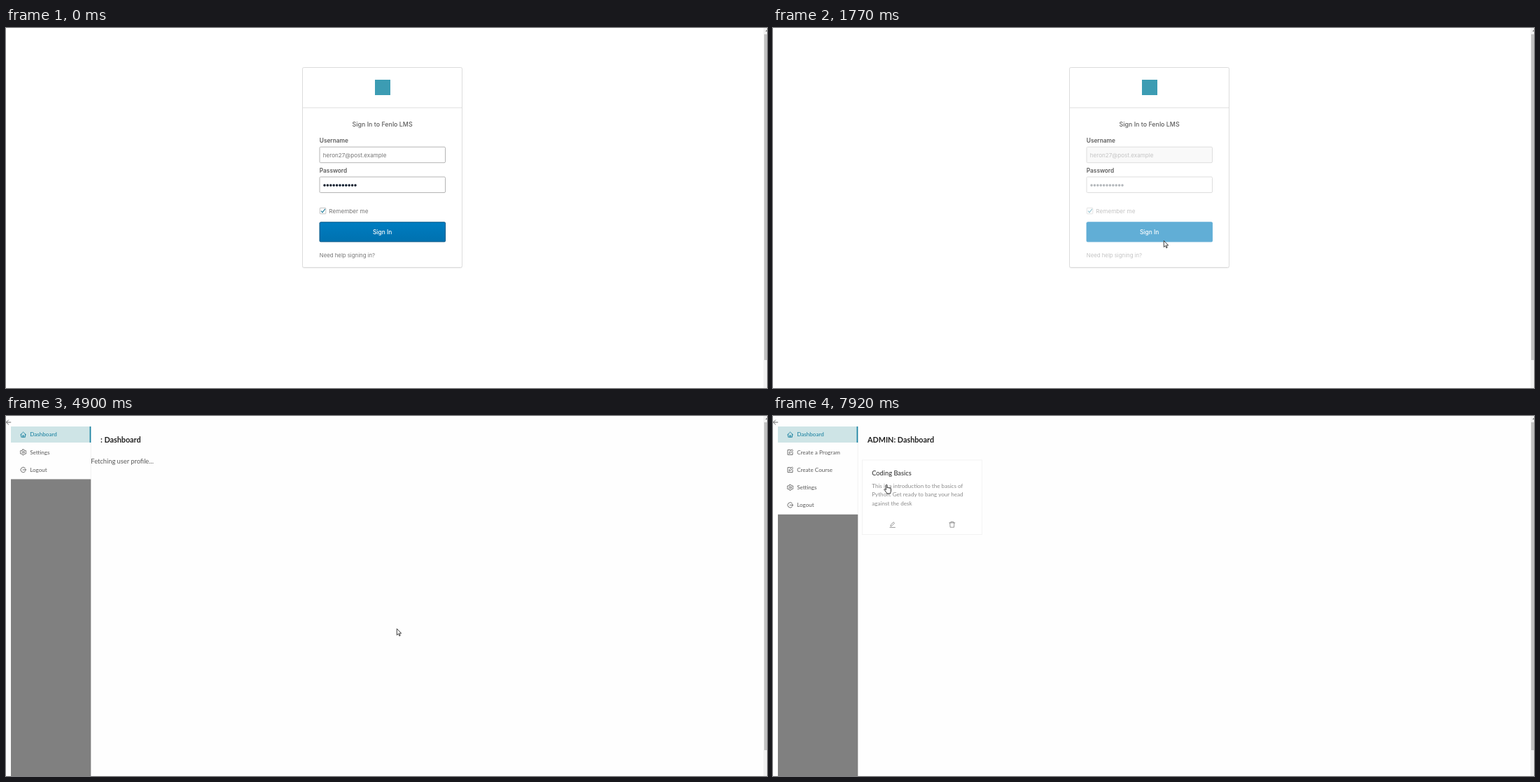
Write an HTML page that moves like this. It is 1087 by 515 pixels and loops after 8 s.

```html
<!DOCTYPE html>
<html lang="en">
<head>
<meta charset="utf-8">
<title>Sign in and dashboard</title>
<style>
html, body { margin: 0; width: 100%; height: 100%; overflow: hidden; background: #fff; }
svg { display: block; width: 1087px; height: 515px; }
#login { font: 400 8px Inter, sans-serif; fill: #777; }
#login .label { font-weight: 600; font-size: 8.3px; fill: #5e5e5e; }
#login .field { fill: #fff; stroke: #b4b4b4; }
#login .dots { fill: #0b1a2b; }
#login .button { fill: url(#blue); stroke: #00517f; }
#login .button.hover { fill: url(#bright); }
#login .tick { stroke: #24809c; }
#login .busy .field { stroke: #dedede; }
#login .busy .user { fill: #f9f9f9; }
#login .busy .soft { fill: #c4c4c4; }
#login .busy .dots { fill: #b3b7bb; }
#login .busy .button { fill: #61aed6; stroke: #61aed6; }
#login .busy .tick { stroke: #9cc8d4; }
#app { font: 400 8.1px Lato, sans-serif; fill: #595959; }
.icon { fill: none; stroke: currentColor; stroke-width: .85; stroke-linejoin: round; stroke-linecap: round; }
</style>
</head>
<body>
<svg viewBox="0 0 1087 515" xmlns="http://www.w3.org/2000/svg">
  <defs>
    <linearGradient id="blue" x2="0" y2="1"><stop stop-color="#007dc1"/><stop offset="1" stop-color="#0071af"/></linearGradient>
    <linearGradient id="bright" x2="0" y2="1"><stop stop-color="#008ad3"/><stop offset="1" stop-color="#007dc0"/></linearGradient>
    <filter id="blur" x="-5%" y="-30%" width="110%" height="160%"><feGaussianBlur stdDeviation="1.3"/></filter>
    <g id="home" class="icon"><path d="M-4 .4 0-3.6 4 .4M-2.9-.6V3.6H2.9V-.6M-.9 3.6V1.2H.9V3.6"/></g>
    <g id="edit" class="icon"><path d="M3.4 0V3.6H-3.6V-3.4H.6M-1.4 1.4-1.1-.4 2.6-4 4-2.6.3 1.1Z"/></g>
    <g id="gear" class="icon"><path d="M-1-3.9H1L1.4-2.7 2.5-2.1 3.6-2.5 4.3-1 3.4 0 4.3 1 3.6 2.5 2.5 2.1 1.4 2.7 1 3.9H-1L-1.4 2.7-2.5 2.1-3.6 2.5-4.3 1-3.4 0-4.3-1-3.6-2.5-2.5-2.1-1.4-2.7Z"/><circle r="1.4"/></g>
    <g id="exit" class="icon"><path d="M2.7-2.6A3.7 3.7 0 1 0 2.7 2.6M-.6 0H4M2.8-1.2 4 0 2.8 1.2"/></g>
  </defs>
  <rect id="page" width="1087" height="515" fill="#fff"/>

  <g id="login"><g id="form">
    <rect x="423.5" y="57.3" width="228" height="286" rx="2" fill="none" stroke="#ececec"/>
    <rect x="423.5" y="56.5" width="228" height="286" rx="2" fill="#fff" stroke="#dcdcdc"/>
    <path d="M424 114H651" stroke="#dedede"/>
    <rect x="527" y="74" width="22" height="22" fill="#3c9cb3"/>
    <g id="spinner">
      <path d="M523 114H552" stroke="#fff" stroke-width="3"/>
      <circle cx="537.7" cy="114" r="8.2" fill="#fff" stroke="#a9b8c6" stroke-width="1.3"/>
      <path id="arc" d="M537.7 105.8A8.2 8.2 0 0 1 545.9 114" fill="none" stroke="#0c79b8" stroke-width="1.4"/>
    </g>
    <text class="label" x="537.6" y="141.2" text-anchor="middle" style="font-size:8.9px;font-weight:500">Sign In to Fenlo LMS</text>
    <text class="label" x="447.8" y="164.3">Username</text>
    <rect class="field user" x="448" y="170.2" width="179.5" height="22.5" rx="1.5"/>
    <text class="soft" x="452.8" y="185" font-size="8.1">heron27@post.example</text>
    <text class="label" x="447.8" y="207.3">Password</text>
    <rect class="field" x="448" y="213" width="179.5" height="22.5" rx="1.5"/>
    <g class="dots" id="dots"></g>
    <rect class="field" x="448.4" y="257.4" width="8.4" height="8.4" rx=".6" stroke-width=".8"/>
    <path class="tick" d="M450 261.6 452 263.8 455.8 258.8" fill="none" stroke-width="1.2"/>
    <text class="soft" x="461.3" y="264.5" font-size="8.2">Remember me</text>
    <rect id="glow" x="446.6" y="276.4" width="182.4" height="31" rx="3" fill="#6ec3e4" filter="url(#blur)"/>
    <rect class="button" id="button" x="448" y="277.8" width="179.6" height="28" rx="1.5" stroke-width=".9"/>
    <text x="537.6" y="294.9" text-anchor="middle" font-size="8.4" font-weight="500" fill="#fff">Sign In</text>
    <text class="soft" id="help" x="447.8" y="328.4" font-size="7.8">Need help signing in?</text>
  </g></g>

  <g id="app">
    <path d="M7.2 9H.4M3.8 5.6.4 9 3.8 12.4" fill="none" stroke="#555" stroke-width=".9"/>
    <rect id="side" x="7" width="114.3" fill="#808080"/>
    <rect id="edge" x="120.8" y="15" width=".6" fill="#ececec"/>
    <rect x="7" y="15" width="114" height="23" fill="#cee4e6"/>
    <rect x="119.6" y="15" width="1.7" height="23" fill="#1882a2"/>
    <g id="menu"></g>
    <text id="title" x="135" y="38.2" font-size="10.8" font-weight="700" fill="#1f1f1f"></text>
    <text id="wait" x="121.3" y="67.5" font-size="9.3">Fetching user profile...</text>
    <g id="card">
      <rect x="127.5" y="63" width="170.8" height="106.6" fill="#fff" stroke="#f0f0f0" stroke-width=".8"/>
      <text x="141.2" y="85.3" font-size="9.3" fill="#262626">Coding Basics</text>
      <g fill="#8c8c8c" id="about"></g>
      <g color="#858585">
        <path class="icon" d="M167 159.4H174.4M168 157.4 168.4 155.6 172.2 151.8 173.6 153.2 169.8 157Z"/>
        <path class="icon" d="M251.8 152.8H259.8M254 152.8V151.2H257.6V152.8M252.7 152.8 253.1 159.2H258.5L258.9 152.8"/>
      </g>
    </g>
  </g>

  <rect x="1082" width="5" height="515" fill="#f1f1f1"/>
  <path d="M1084.6 5 1087 2.6V5Z" fill="#777"/>
  <rect id="thumb" x="1083" y="9" width="4" fill="#c1c1c1"/>

  <g id="cursor" fill="#fff" stroke="#222" stroke-width="1.5" stroke-linejoin="round">
    <path id="arrow" transform="scale(.57)" d="M0 0V16L3.8 12.6 6.2 18.2 8.6 17.2 6.2 11.6H11.2Z"/>
    <path id="hand" transform="scale(.62) translate(-7 -1)" d="M5.5 13V2.5a1.5 1.5 0 0 1 3 0V8.5c0-1.5 3-1.5 3 .3 0-1.4 2.8-1.2 2.8.6 0-1.2 2.7-1 2.7.8V15c0 3-1.5 4-1.5 6.5H7.5C7.3 19 3.5 15.5 1.5 12.5.8 11.2 2.4 10.2 3.6 11.2Z"/>
  </g>
</svg>
<script>
const LOOP = 8000;
const $ = id => document.getElementById(id);
const show = (id, on) => { $(id).style.display = on ? '' : 'none'; };
const clamp = v => Math.max(0, Math.min(1, v));

$('dots').innerHTML = Array.from({ length: 11 }, (_, i) =>
  `<circle cx="${455 + i * 4.4}" cy="225" r="1.75"/>`).join('');

$('about').innerHTML = [
  'This is a introduction to the basics of',
  'Python. Get ready to bang your head',
  'against the desk'
].map((line, i) => `<text x="141.2" y="${102.6 + i * 12.6}">${line}</text>`).join('');

const ROW = 25.2, TOP = 26.6;
const menu = [
  ['Dashboard', 'home'], ['Create a Program', 'edit'], ['Create Course', 'edit'],
  ['Settings', 'gear'], ['Logout', 'exit']
].map(([label, icon]) => {
  const g = document.createElementNS('http://www.w3.org/2000/svg', 'g');
  g.innerHTML = `<use href="#${icon}" x="24.6"/><text x="34.2" y="2.8" fill="currentColor">${label}</text>`;
  $('menu').append(g);
  return g;
});

// Pointer waypoints: time, x, y
const path = [
  [110, 1012, 508], [200, 930, 440], [330, 790, 345], [450, 690, 288], [530, 628, 311],
  [610, 515, 319], [700, 520, 320], [790, 545, 319], [1190, 545, 319], [1320, 558.3, 304.3],
  [5580, 558.3, 304.3], [5800, 430, 250], [6000, 270, 170], [6200, 150, 110],
  [6370, 103, 91], [6440, 103, 91], [6580, 91, 51], [6640, 91, 51], [6850, 93, 55],
  [7130, 95, 52], [7360, 95, 52], [7780, 152, 92], [7920, 162.3, 98.3]
];

function pointer(t) {
  const i = path.findIndex(p => p[0] > t);
  if (i < 0) return path[path.length - 1].slice(1);
  const [t0, x0, y0] = path[Math.max(0, i - 1)], [t1, x1, y1] = path[i];
  const k = t1 > t0 ? clamp((t - t0) / (t1 - t0)) : 0;
  return [x0 + (x1 - x0) * k, y0 + (y1 - y0) * k];
}

// Hover strength with a 300 ms fade on each side
const hover = (t, on, off) => clamp((t - on) / 300) * (t < off ? 1 : 0) +
  clamp((off - on) / 300) * (t < off ? 0 : clamp(1 - (t - off) / 300));

function mix(k) {
  const rest = [89, 89, 89], lit = [20, 126, 158];
  return `rgb(${rest.map((c, i) => Math.round(c + (lit[i] - c) * clamp(k))).join()})`;
}

function drawLogin(t) {
  const busy = t >= 1650, hot = t >= 1290 && !busy;
  $('form').setAttribute('class', busy ? 'busy' : '');
  $('button').setAttribute('class', hot ? 'button hover' : 'button');
  show('glow', hot);
  $('help').style.fill = t > 590 && t < 730 ? '#5e5e5e' : '';
  show('spinner', t >= 1850);
  $('arc').setAttribute('transform', `rotate(${(t - 2740) * .36} 537.7 114)`);
}

function drawApp(t) {
  const ready = t >= 5580;
  const rows = ready ? [0, 1, 2, 3, 4] : [0, 3, 4];
  const bottom = ready ? 140.8 : 90.4;
  const glow = [1, hover(t, 6490, 7450),
    hover(t, 6220, 6550) + hover(t, 7470, 7570), 0, 0];
  menu.forEach((g, i) => {
    const row = rows.indexOf(i);
    g.style.display = row < 0 ? 'none' : '';
    g.setAttribute('transform', `translate(0 ${TOP + row * ROW})`);
    g.style.color = mix(glow[i]);
  });
  $('side').setAttribute('y', bottom);
  $('side').setAttribute('height', 515 - bottom);
  $('edge').setAttribute('height', bottom - 15);
  $('title').textContent = ready ? 'ADMIN: Dashboard' : ': Dashboard';
  show('wait', t < 5370);
  show('card', ready);
}

function drawPointer(t) {
  const [x, y] = pointer(t);
  const overMenu = x > 7 && x < 121 && y > 15 && y < 141;
  const overCard = x > 127 && x < 298 && y > 63 && y < 170;
  const link = t >= 5580 && (overMenu || overCard);
  show('cursor', t >= 110);
  show('hand', link);
  show('arrow', !link);
  $('cursor').setAttribute('transform', `translate(${x} ${y})`);
}

function draw(t) {
  const login = t < 3650, app = t >= 4900;
  show('login', login);
  show('app', app);
  $('page').setAttribute('fill', login ? '#fff' : '#fefefe');
  $('thumb').setAttribute('height', login ? 466 : app ? 469 : 503);
  if (login) drawLogin(t);
  if (app) drawApp(t);
  drawPointer(t);
}

const start = performance.now();
function tick() {
  draw((performance.now() - start) % LOOP);
  requestAnimationFrame(tick);
}
tick();
</script>
</body>
</html>
```
